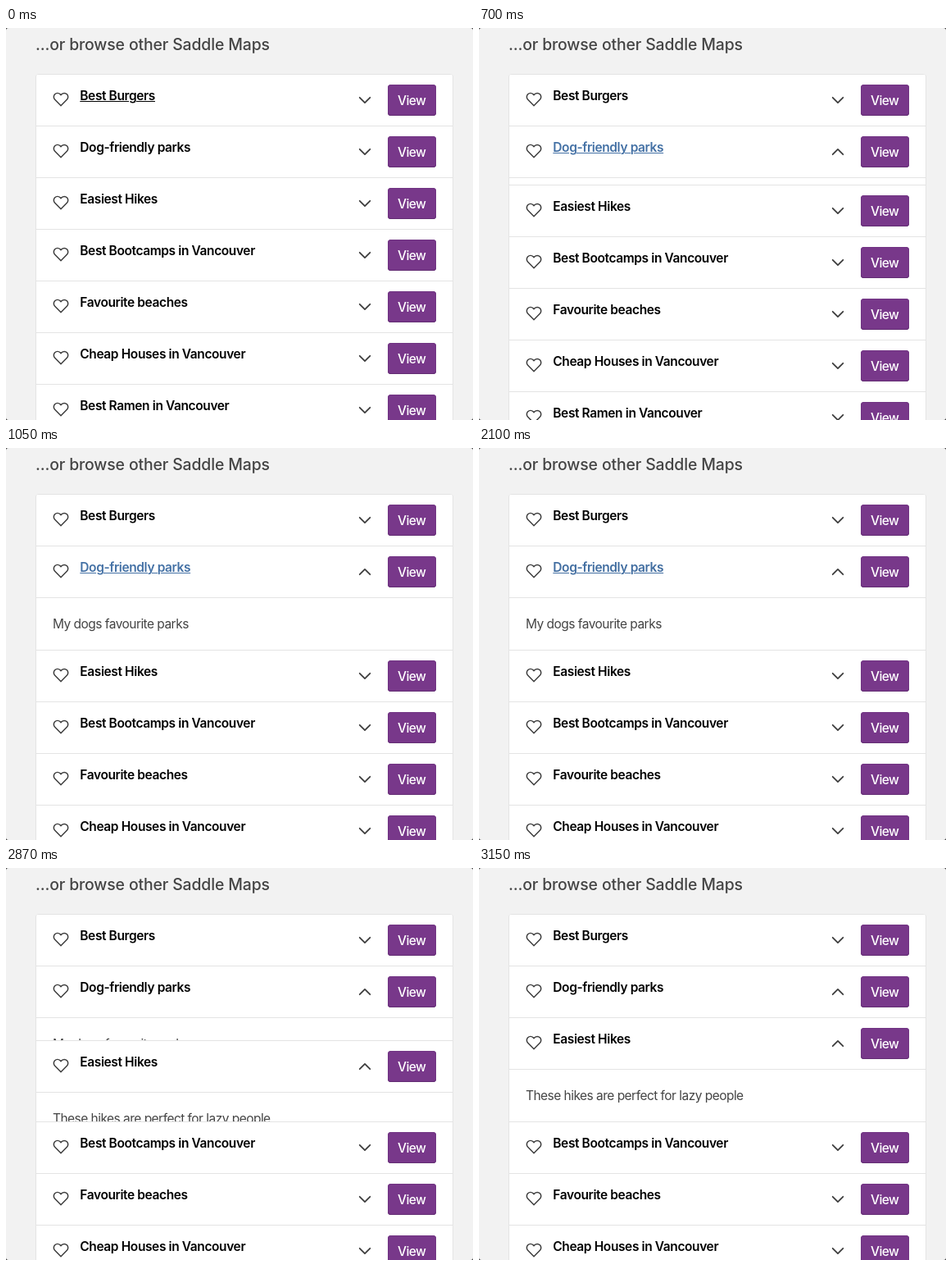
An HTML page for the animation above (4.06 s loop, 570 by 478 pixels).

```html
<!DOCTYPE html>
<html lang="en">
<head>
<meta charset="utf-8">
<title>Map list</title>
<style>
html, body { margin: 0; width: 100%; height: 100%; overflow: hidden; }
html { background: #333; }
body { position: relative; border-radius: 3px; background: #f2f2f2; font-family: Inter, "Open Sans", sans-serif; color: #444; }
/* An empty strut puts the text baseline exactly --b below the top. */
.text { position: absolute; line-height: 0; white-space: nowrap; }
.text::before { content: ""; display: inline-block; height: var(--b); }
.heading { --b: 27px; left: 36px; top: 0; font-size: 19.4px; font-weight: 500; letter-spacing: -.13px; }
.card { position: absolute; left: 36px; top: 56px; width: 508px; border: solid #e4e4e4; border-width: 0 1px;
  border-radius: 4px 4px 0 0; background: #fff; overflow: hidden; }
.row { position: relative; height: 62px; border-top: 1px solid #e4e4e4; }
.title { --b: 31px; left: 53.3px; top: 0; font-size: 15.5px; font-weight: 600; letter-spacing: -.39px; color: #000; }
.title span { text-decoration: none 1px; text-underline-offset: 1px; }
.panel { position: relative; height: 0; overflow: hidden; }
.inner { position: relative; height: 63px; border-top: 1px solid #e4e4e4; }
.note { --b: 37px; left: 20px; top: 0; font-size: 15.5px; letter-spacing: -.53px; }
.view { --b: 25px; left: 429px; top: 12px; width: 59px; height: 38px; box-sizing: border-box; border-radius: 4px;
  background: #78388a; box-shadow: inset 0 -1px #632d73, inset 0 0 0 1px #713483; color: #fff; text-align: center;
  font-size: 15.5px; font-weight: 500; letter-spacing: -.6px; text-indent: -.6px; }
svg { position: absolute; fill: none; stroke: #3c3c3c; }
.heart { left: 19.6px; top: 20.4px; width: 20px; height: 20px; stroke-width: 1.8; }
.chevron { left: 392px; top: 22px; width: 18px; height: 18px; stroke-width: 1.75; stroke-linecap: round; stroke-linejoin: round; }
</style>
</head>
<body>
<div class="text heading">...or browse other Saddle Maps</div>
<div class="card" id="card"></div>
<script>
const LOOP = 4060, STEP = 70, PANEL = 64;
const BLACK = [0, 0, 0], BLUE = [68, 113, 165];
const items = [
  ["Best Burgers"],
  ["Dog-friendly parks", "My dogs favourite parks"],
  ["Easiest Hikes", "These hikes are perfect for lazy people"],
  ["Best Bootcamps in Vancouver"],
  ["Favourite beaches"],
  ["Cheap Houses in Vancouver"],
  ["Best Ramen in Vancouver"]
];

const heart = `<svg class="heart" viewBox="0 0 24 24"><path d="M20.84 4.61a5.5 5.5 0 0 0-7.78 0L12 5.67l-1.06-1.06a5.5 5.5 0 0 0-7.78 7.78L12 21.23l8.84-8.84a5.5 5.5 0 0 0 0-7.78z"/></svg>`;
const chevron = `<svg class="chevron" viewBox="-9 -9 18 18"><path d="M-6.3-3.2L0 3.1L6.3-3.2"/></svg>`;

const card = document.getElementById("card");
card.innerHTML = items.map(([title, note = ""]) => `
  <div class="row">${heart}<div class="text title"><span>${title}</span></div>${chevron}<div class="text view">View</div></div>
  <div class="panel"><div class="inner"><div class="text note">${note}</div></div></div>`).join("");

const titles = card.querySelectorAll(".title span");
const arrows = card.querySelectorAll(".chevron");
const panels = card.querySelectorAll(".panel");

const clamp = v => Math.min(1, Math.max(0, v));
const progress = (t, start, length) => ease(clamp((t - start) / length));

// cubic-bezier(.25, .1, .25, 1), solved for x by bisection
function ease(x) {
  if (x <= 0 || x >= 1) return x;
  let lo = 0, hi = 1, s;
  for (let i = 0; i < 24; i++) {
    s = (lo + hi) / 2;
    if (.75 * s * (1 - s) + s ** 3 < x) lo = s; else hi = s;
  }
  return .3 * s * (1 - s) ** 2 + 3 * s * s * (1 - s) + s ** 3;
}

function underline(i, on) {
  titles[i].style.textDecorationLine = on ? "underline" : "none";
}

function setOpen(i, height, flipped) {
  panels[i].style.height = height + "px";
  arrows[i].style.transform = flipped ? "scaleY(-1)" : "none";
}

function draw(t) {
  const hover = progress(t, 340, 250) - progress(t, 2090, 250);
  const mix = BLACK.map((c, k) => Math.round(c + (BLUE[k] - c) * hover));
  titles[1].style.color = `rgb(${mix})`;
  underline(0, t < 560);
  underline(1, t >= 340 && t < 2660);

  const parks = Math.round(PANEL * progress(t, 655, 350));
  const hikes = Math.round(PANEL * progress(t, 2756, 350));
  setOpen(1, parks - hikes, t >= 655);
  setOpen(2, hikes, t >= 2756);
}

const start = performance.now();
function tick() {
  const t = (performance.now() - start) % LOOP;
  draw(Math.floor(t / STEP) * STEP);
  requestAnimationFrame(tick);
}
tick();
</script>
</body>
</html>
```
